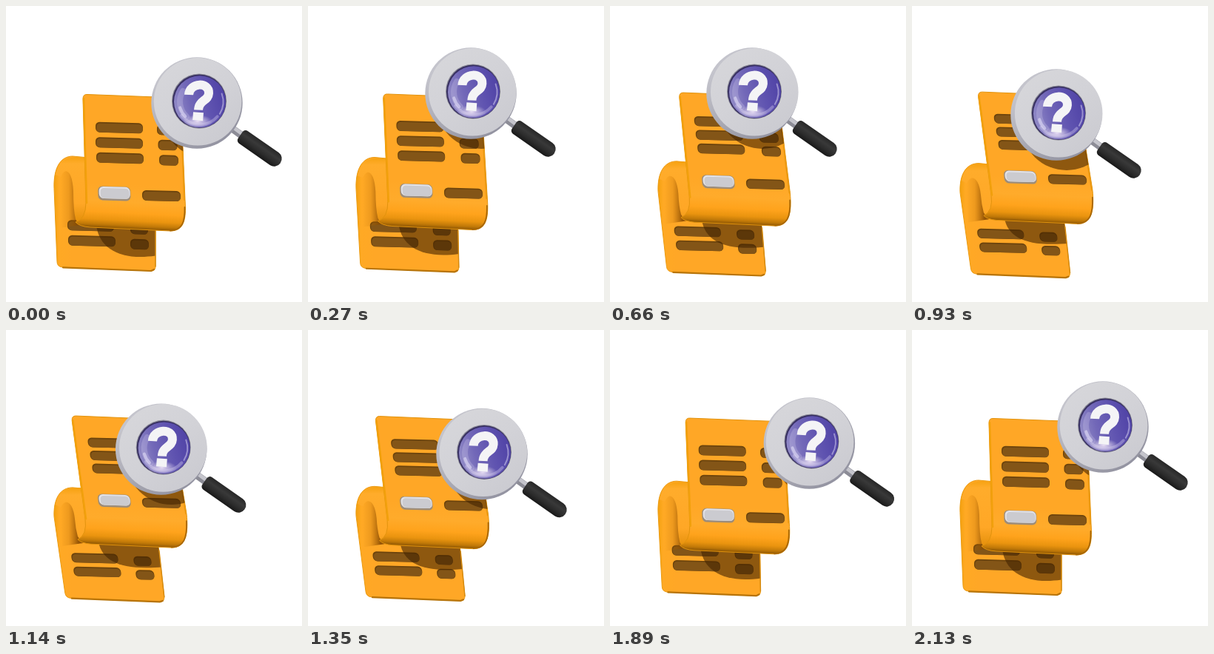
An HTML page with a canvas that plays this animation: 400x400 px, repeating every 2.16 s.

```html
<!DOCTYPE html>
<html lang="en">
<head>
<meta charset="utf-8">
<title>Searching a document</title>
<style>
  html, body { margin: 0; width: 100%; height: 100%; overflow: hidden; background: #fff; }
  canvas { display: block; width: 400px; height: 400px; }
</style>
</head>
<body>
<canvas id="stage"></canvas>
<script>
const LOOP = 2160, STEP = 30, PERIOD = LOOP - STEP;
const SHADOW = 'rgba(68,36,0,.6)';
const canvas = document.getElementById('stage');
const ratio = window.devicePixelRatio || 1;
canvas.width = canvas.height = 400 * ratio;
const c = canvas.getContext('2d');

// Lens centre: time, x, y
const track = [
  [0, 258, 131], [270, 220, 118], [490, 202, 109], [660, 192, 118], [930, 195, 147],
  [1090, 205, 158.5], [1350, 235, 167.5], [1620, 268, 170], [1680, 268.7, 168.5]
];

function key(i) {
  const n = track.length, turn = Math.floor(i / n), k = track[i - turn * n];
  return [k[0] + turn * PERIOD, k[1], k[2]];
}

// Smooth closed curve through the track points
function lensAt(t) {
  let i = track.length - 1;
  while (track[i][0] > t) i--;
  const [a, p, q, b] = [i - 1, i, i + 1, i + 2].map(key);
  const h = q[0] - p[0], u = (t - p[0]) / h;
  const slope = (l, m, r, d) => {
    const h1 = m[0] - l[0], h2 = r[0] - m[0];
    return ((m[d] - l[d]) / h1 * h2 + (r[d] - m[d]) / h2 * h1) / (h1 + h2);
  };
  return [1, 2].map(d =>
    (1 + 2 * u) * (1 - u) ** 2 * p[d] + u * (1 - u) ** 2 * h * slope(a, p, q, d) +
    u * u * (3 - 2 * u) * q[d] + u * u * (u - 1) * h * slope(p, q, b, d));
}

let bend = 0;
const mix = (a, b) => a + (b - a) * bend;

// Blend two paths that share the same commands
function morph(upright, bent) {
  const ends = bent.match(/-?[\d.]+/g);
  let i = 0;
  return new Path2D(upright.replace(/-?[\d.]+/g, v => mix(+v, +ends[i++])));
}

function linear(x0, y0, x1, y1, ...stops) {
  return addStops(c.createLinearGradient(x0, y0, x1, y1), stops);
}

function addStops(gradient, stops) {
  stops.forEach(([at, color]) => gradient.addColorStop(at, color));
  return gradient;
}

function fill(path, style) {
  c.fillStyle = style;
  c.fill(path);
}

function stroke(path, style, width) {
  c.strokeStyle = style;
  c.lineWidth = width;
  c.stroke(path);
}

function disc(x, y, r, style) {
  c.beginPath();
  c.arc(x, y, r, 0, 7);
  c.fillStyle = style;
  c.fill();
}

// Rounded rectangle around a centre
function pill(x, y, w, h, r, style) {
  c.beginPath();
  c.roundRect(x - w / 2, y - h / 2, w, h, r);
  c.fillStyle = style;
  c.fill();
}

// Rounded bar: left and centre height in both poses, width
function bar(x0, y0, x1, y1, w) {
  const h = mix(14, 13);
  c.save();
  c.translate(mix(x0, x1) + w / 2, mix(y0, y1));
  c.transform(1, .026, mix(.02, .12), 1, 0, 0);
  pill(0, 0, w, h, 5.5, '#6b430c');
  pill(.4, .8, w - 1.6, h - 1.8, 5, '#835517');
  c.restore();
}

function backSheet() {
  const sheet = morph(
    'M65 246C64 218 74 203 90 203L112 205L140 290L202 300L202 352Q202 358 196 358L76 353Q69 352 69 346Z',
    'M65 252C64 228 73 213 90 213L112 215L140 285L206 292L214 361Q214 368 208 367.5L88 362.5Q81 362 80 356Z');
  fill(sheet, linear(64, 0, 90, 0, [0, '#f2a00c'], [.3, '#ffa924'], [1, '#ffa726']));
  stroke(sheet, '#eb9a0f', 1);

  bar(83, 297, 88.5, 308.5, 63);
  bar(84, 317.5, 91.5, 327, 64);
  bar(168, 301.5, 172.5, 312.5, 24);
  bar(168, 322, 175.5, 331, 25);

  c.save();
  c.clip(sheet);
  fill(morph(
    'M122 296C126 330 158 345 206 337L210 296Z',
    'M125 286C130 313 156 325 213 320L214 286Z'), SHADOW);
  c.restore();

  stroke(morph('M77 353.3L196 358L200 356', 'M89 362.8L208 367.5L212 366'), '#b87408', 2.2);
  stroke(morph('M202 304L202 352', 'M207 298L214 361'), '#d58a10', 1.4);
}

function fold() {
  // Shaded underside of the fold
  fill(morph(
    'M72 300L72 240C74 205 94 206 97 250L100 296Z',
    'M76 292L73 252C74 215 96 215 99 248L104 288Z'),
    linear(74, 0, 98, 0, [0, 'rgba(170,98,0,0)'], [.45, 'rgba(170,98,0,.2)'], [1, 'rgba(130,70,0,.85)']));

  const leg = morph(
    'M67 228C72 205 84 203 108 205L112 299Q98 298 94 288Q91 276 91 250C90 223 80 216 74 231Z',
    'M67 236C72 214 84 212 110 214L114 289Q102 288 97 279Q94 268 93 255C91 233 80 226 74 240Z');
  const top = mix(203, 213);
  fill(leg, linear(0, top, 0, top + 85, [0, '#f5a10f'], [.12, '#ffac2b'], [.75, '#ffa726'], [1, '#e8930f']));
}

function frontSheet(lx, ly) {
  const sheet = morph(
    'M104 125Q104 119 110 119.5L229 124Q236 124.5 236.5 131L242 262C244 290 240 304 222 304L114 299Q99 298 94 292Q108 288 108 266Z',
    'M89 122Q88.5 116 94 116L216 121Q223 122 224 128L244 248C247 277 242 294 224 294L114 289Q102 288 97 283Q110 277 107 255Z');
  const base = mix(301, 291);
  fill(sheet, linear(169, base - 60, 166, base,
    [0, '#ffa726'], [.4, '#ffab2b'], [.65, '#ffa31c'], [.82, '#ea940f'], [.93, '#c17908'], [1, '#915803']));
  stroke(sheet, '#e2930d', 1);
  stroke(morph('M105 125L109 266', 'M90 122L108 255'), '#f2a00c', 2.5);
  stroke(morph('M235.5 131L241 262', 'M223 128L243 248'), '#ec9a12', 2);
  stroke(morph('M241.5 272C242 292 238 303 222 303.5', 'M244 258C245 282 240 293 224 293.5'), '#a86704', 1.8);

  [[121, 164.5, 110.5, 152.5, 204], [121, 185, 113.5, 170, 205.5], [122, 205.5, 116.5, 187.5, 207]]
    .forEach(([x0, y0, x1, y1, right], i) => {
      bar(x0, y0, x1, y1, 64);
      bar(right, y0 + 3, right - 8 + i * 2.5, y1 + 3.5, 26);
    });
  bar(184, 256.5, 184, 233.5, 52);

  const h = mix(19, 17.5);
  c.save();
  c.translate(146.3, mix(253, 230));
  c.transform(1, .03, mix(.03, .12), 1, 0, 0);
  pill(0, .4, 44, h, 6, '#9c8c79');
  pill(.4, -.6, 42, h - 3, 6, '#e3e3e8');
  pill(.8, .3, 39, h - 5, 5, '#cbcbd0');
  c.restore();

  c.save();
  c.clip(sheet);
  disc(lx + 14, ly + 14, 61, SHADOW);
  c.restore();
}

function magnifier(x, y) {
  c.save();
  c.translate(x, y);

  stroke(new Path2D('M44 32L62 45'), '#8c8c96', 10);
  stroke(new Path2D('M45 30L62 42.5'), '#c5c5cc', 5);
  c.save();
  c.translate(59.5, 44);
  c.rotate(.61);
  pill(32, 0, 66, 20.5, [5, 10, 10, 5], linear(0, -10, 0, 10,
    [0, '#272727'], [.35, '#393939'], [.7, '#2b2b2b'], [1, '#191919']));
  c.restore();

  const tilt = Math.max(.7, (290 - x) / 30);
  disc(0, 0, 61.7, linear(-50, -30, 30, 60, [0, '#c4c4cc'], [.55, '#a5a5b0'], [1, '#9292a0']));
  disc(tilt, -1.7, 59.3, linear(-40, -50, 40, 50, [0, '#d6d6da'], [.5, '#d2d2d7'], [1, '#cbcbd1']));

  disc(3, -2.5, 37, '#8b8b96');
  disc(3.2, -2.2, 36.2, '#383063');
  disc(4, -1.7, 35, linear(-28, 10, 38, -8,
    [0, '#8f88c6'], [.3, '#7268b8'], [.65, '#5f53b0'], [1, '#5043a6']));

  // Reflections on the glass
  const shine = (from, to, r, alpha, w) => {
    c.beginPath();
    c.arc(4, -1.7, r, from, to);
    c.strokeStyle = `rgba(240,236,255,${alpha})`;
    c.lineWidth = w;
    c.stroke();
  };
  shine(2.3, 3.7, 27, .2, 8);
  shine(2.35, 2.85, 28, .5, 4);
  shine(-.35, .55, 31.5, .45, 2);
  shine(.7, 2.5, 31, .3, 4);
  c.save();
  c.translate(1, 25);
  c.scale(1, .45);
  disc(0, 0, 20, addStops(c.createRadialGradient(0, 0, 1, 0, 0, 20),
    [[0, 'rgba(255,245,255,.8)'], [1, 'rgba(255,245,255,0)']]));
  c.restore();

  c.lineCap = 'butt';
  c.translate((x - 258) / 60, 0);
  stroke(new Path2D('M-11 -11C-10 -28 17 -29 16 -13C15.5 -2.5 2.5 -4 2 9.5'), '#f4f4f6', 12);
  c.rotate(.08);
  c.fillStyle = '#f4f4f6';
  c.fillRect(-4, 12.5, 14, 11);
  c.restore();
}

function draw(now) {
  const t = Math.floor(now % LOOP / STEP) * STEP % PERIOD;
  bend = (1 - Math.cos(2 * Math.PI * t / PERIOD)) / 2;
  const [x, y] = lensAt(t);
  c.setTransform(ratio, 0, 0, ratio, 0, 0);
  c.fillStyle = '#fff';
  c.fillRect(0, 0, 400, 400);
  c.lineCap = c.lineJoin = 'round';
  backSheet();
  fold();
  frontSheet(x, y);
  magnifier(x, y);
}

function loop() {
  draw(performance.now());
  requestAnimationFrame(loop);
}
loop();
</script>
</body>
</html>
```
